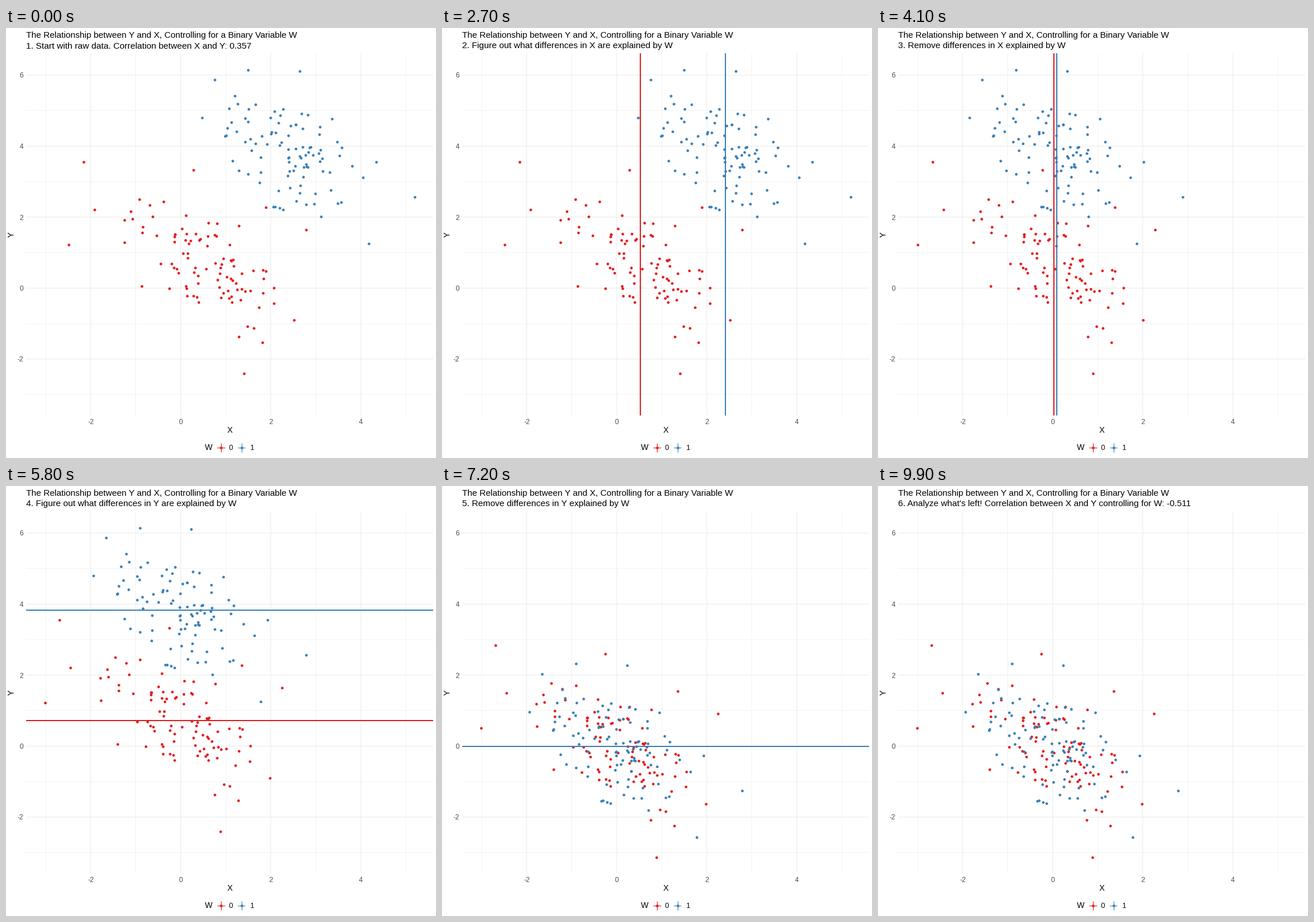
These frames come from a looping animation (748x748 px, 10 s). A matplotlib script:

```python
import matplotlib.pyplot as plt
import numpy as np
from matplotlib.animation import FuncAnimation
from matplotlib.lines import Line2D

SIZE, DPI, FRAMES = 748, 100, 100
RED, BLUE = "#E41A1C", "#377EB8"
GRID, TICK = "#EBEBEB", "#4D4D4D"
LEFT, RIGHT, TOP, BOTTOM = 35, 743, 44, 674   # panel edges, px from top left
X0, Y0, XU, YU = 304, 452.5, 78.3, 61.75      # origin and unit size, px
PT = 72 / DPI
DOT = 4.6 * PT

plt.rcParams["font.family"] = "Liberation Sans"

TITLE = "The Relationship between Y and X, Controlling for a Binary Variable W"
STEPS = [
    "1. Start with raw data. Correlation between X and Y: 0.357",
    "2. Figure out what differences in X are explained by W",
    "3. Remove differences in X explained by W",
    "4. Figure out what differences in Y are explained by W",
    "5. Remove differences in Y explained by W",
    "6. Analyze what's left! Correlation between X and Y controlling for W: -0.511",
]
STEP_STARTS = [20, 34, 48, 62, 76]
X_MOVE, Y_MOVE, MOVE_LEN = 34, 62, 8
VLINES, HLINES = range(23, 48), range(51, 76)

# The outermost points of each group; the rest is random.
RED_EDGE = [(-2.49, 1.23), (-2.16, 3.56), (-1.92, 2.21), (-.87, .06), (.28, 3.32),
            (1.89, 2.27), (2.78, 1.64), (2.51, -.9), (1.41, -2.41)]
BLUE_EDGE = [(.47, 4.8), (.75, 5.87), (1.5, 6.15), (2.64, 6.11), (3.36, 4.77),
             (4.34, 3.56), (5.2, 2.57), (4.18, 1.26), (2.06, 2.29)]


def make_group(edge, mean, spread, slope, rng, n=100):
    """Fill the group up to n points whose average is exactly `mean`."""
    edge, mean = np.array(edge), np.array(mean)
    z = rng.normal(size=(4 * n, 2))
    core = z[np.hypot(*z.T) < 2.1][:n - len(edge)] * spread
    core[:, 1] += slope * core[:, 0]
    core += (n * mean - edge.sum(axis=0)) / len(core) - core.mean(axis=0)
    return np.vstack([edge, core])


def ease(t):
    return (1 - np.cos(np.pi * np.clip(t, 0, 1))) / 2


fig = plt.figure(figsize=(SIZE / DPI, SIZE / DPI), dpi=DPI, facecolor="white")


def label(x, y, s, px, color="black", ha="center", va="center_baseline", **kw):
    return fig.text(x / SIZE, 1 - y / SIZE, s, fontsize=px * PT, color=color,
                    ha=ha, va=va, **kw)


def stroke(xs, ys, color, **kw):
    fig.add_artist(Line2D(np.array(xs) / SIZE, 1 - np.array(ys) / SIZE,
                          color=color, lw=1.07 * PT, solid_capstyle="butt", **kw))


ax = fig.add_axes([LEFT / SIZE, 1 - BOTTOM / SIZE,
                   (RIGHT - LEFT) / SIZE, (BOTTOM - TOP) / SIZE])
ax.set_xlim((LEFT - X0) / XU, (RIGHT - X0) / XU)
ax.set_ylim((Y0 - BOTTOM) / YU, (Y0 - TOP) / YU)
ax.axis("off")

for v in range(-3, 7):
    style = dict(color=GRID, lw=(0.55 if v % 2 else 1.07) * PT, zorder=0, snap=False)
    ax.axhline(v, **style)
    if v < 6:
        ax.axvline(v, **style)

for v in range(-2, 7, 2):
    label(30.5, Y0 - v * YU, str(v), 12, TICK, ha="right")
    if v < 6:
        label(X0 + v * XU, 684.5, str(v), 12, TICK)
label(389, 698.5, "X", 14)
label(10, 359, "Y", 14, rotation=90, va="center")

label(353, 729, "W", 14)
for x, color, name in [(373.5, RED, "0"), (409.5, BLUE, "1")]:
    stroke([x - 7, x + 7], [729.5, 729.5], color)
    stroke([x, x], [721.5, 737.5], color)
    stroke([x], [729.5], color, marker="o", ms=DOT, mew=0)
    label(x + 18, 729, name, 12.5)

label(35, 17, TITLE, 15.15, ha="left", va="baseline")
subtitle = label(35, 35.5, STEPS[0], 15.3, ha="left", va="baseline")

rng = np.random.default_rng(11)
groups = []
for edge, mean, spread, slope, color in [
    (RED_EDGE, (.53, .72), (.95, .85), -.7, RED),
    (BLUE_EDGE, (2.41, 3.83), (.88, .9), -.4, BLUE),
]:
    pts = make_group(edge, mean, spread, slope, rng)
    dots = ax.scatter(*pts.T, s=DOT ** 2, color=color, lw=0, zorder=2)
    vline = ax.axvline(mean[0], color=color, lw=2 * PT, zorder=3)
    hline = ax.axhline(mean[1], color=color, lw=2 * PT, zorder=3)
    groups.append((pts, np.array(mean), dots, vline, hline))


def update(i):
    subtitle.set_text(STEPS[sum(i >= s for s in STEP_STARTS)])
    done = np.array([ease((i - s) / MOVE_LEN) for s in (X_MOVE, Y_MOVE)])
    for pts, mean, dots, vline, hline in groups:
        dots.set_offsets(pts - mean * done)
        x, y = mean * (1 - done)
        vline.set_xdata([x, x])
        hline.set_ydata([y, y])
        vline.set_visible(i in VLINES)
        hline.set_visible(i in HLINES)
    return []


anim = FuncAnimation(fig, update, frames=FRAMES, interval=100, repeat=True,
                     repeat_delay=0, blit=False)
plt.show()
```
